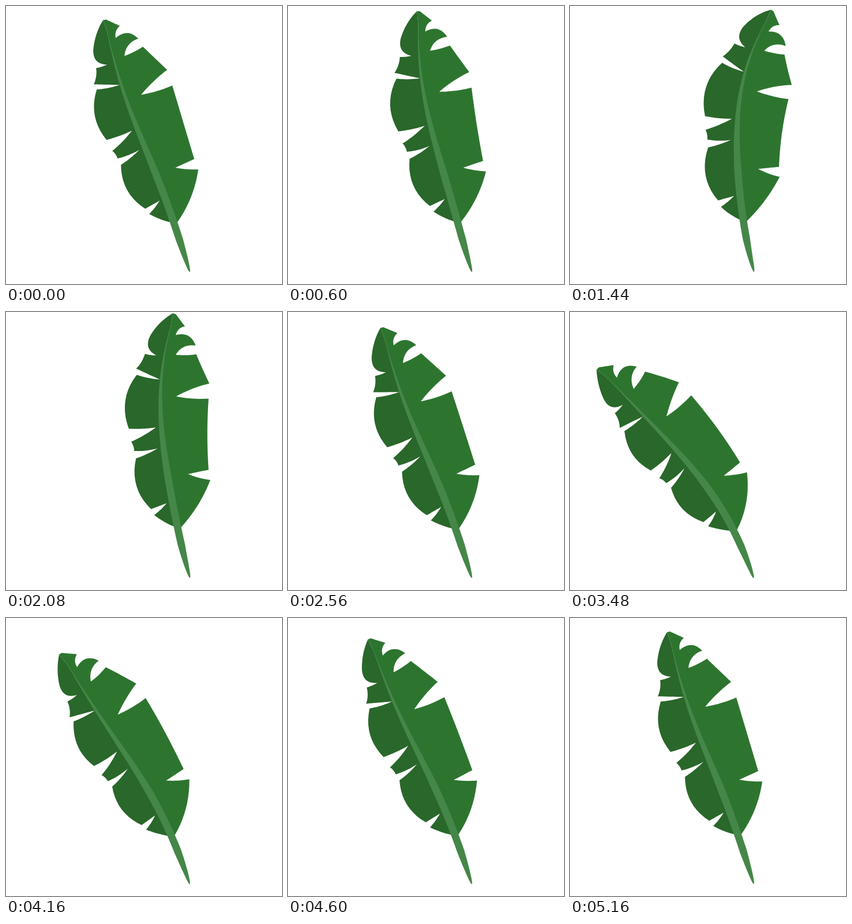
An HTML page with a canvas for the animation above (5.24 s loop, 478x480 px).

```html
<!DOCTYPE html>
<html>
<head>
<meta charset="utf-8">
<style>
html, body { margin: 0; height: 100%; overflow: hidden; background: #fff; }
canvas { display: block; }
</style>
</head>
<body>
<canvas id="stage" width="478" height="480"></canvas>
<script>
const ctx = document.getElementById('stage').getContext('2d');
const LOOP = 5240, STEP = 40;

// The bend axis runs from the pivot, just below the stem, towards the leaf tip.
const PIVOT = [330.7, 481], AXIS = [-0.326, -0.945], LENGTH = 485;
const TIP = [168, 24], LEFT = -1, RIGHT = 1;

// Bend in degrees (positive leans left) at each time, eased between.
const KEYS = [[20, 0], [1570, -44.1], [3355, 34.7], [5160, 0]];

// How far the edge leading out of a cut bows, as a share of its length.
const CUT_BOW = -0.06;

// Lobes from the tip down: two outer corners, the bow between them,
// then the inner end of the cut below and the bow on the way there.
const LEFT_LOBES = [
  { from: TIP, to: [151, 76], bow: 0.12, cut: [175, 101], hook: 0.5 },
  { from: [156, 107], to: [152, 135], bow: -0.14, cut: [197, 136], hook: 0 },
  { from: [157, 144], to: [174, 231], bow: 0.27, cut: [218, 215], hook: 0.05 },
  { from: [184, 250], to: [193, 263], bow: -0.15, cut: [231, 248], hook: 0.08 },
  { from: [199, 274], to: [241, 350], bow: 0.27, cut: [266, 336], hook: 0 },
  { from: [248, 359], to: [287, 374], bow: 0.07, cut: [287, 374], hook: 0 }
];
const RIGHT_LOBES = [
  { from: [173, 23], to: [197, 34], bow: 0, cut: [190, 55], hook: -0.3 },
  { from: [190, 55], to: [229, 56], bow: 0.47, cut: [205, 86], hook: -0.32 },
  { from: [237, 70], to: [279, 110], bow: 0, cut: [234, 153], hook: -0.06 },
  { from: [288, 137], to: [326, 264], bow: 0, cut: [293, 279], hook: 0 },
  { from: [333, 282], to: [297, 373], bow: 0.12, cut: [290, 374], hook: 0 }
];

// Page position of a point u along the axis and v to its right.
function place(u, v) {
  const [ax, ay] = AXIS;
  return [PIVOT[0] + u * ax - v * ay, PIVOT[1] + u * ay + v * ax];
}

const veinCenter = u => u / 50 * Math.sin(Math.PI * (200 - u) / 262) - 5;
const veinHalf = u => Math.min(6.3, 6.3 * Math.sqrt((u - 24) / 60), (470 - u) / 43);

// Follows the vein upwards, on its centre line (side 0) or one of its edges.
function alongVein(first, last, side) {
  const points = [];
  for (let u = first; u <= last; u += 3) {
    points.push(place(u, veinCenter(u) + side * veinHalf(u)));
  }
  return points;
}

// Adds a quadratic curve whose control point is offset sideways by the bow.
function arc(points, [x, y], bow) {
  const [x0, y0] = points[points.length - 1];
  const cx = (x0 + x) / 2 + bow * (y - y0), cy = (y0 + y) / 2 - bow * (x - x0);
  for (let i = 1; i <= 10; i++) {
    const s = i / 10, r = 1 - s;
    points.push([r * r * x0 + 2 * r * s * cx + s * s * x,
                 r * r * y0 + 2 * r * s * cy + s * s * y]);
  }
}

function blade(lobes, side) {
  const points = [TIP];
  for (const { from, to, bow, cut, hook } of lobes) {
    arc(points, from, side * CUT_BOW);
    arc(points, to, side * bow);
    arc(points, cut, side * hook);
  }
  return points.concat(alongVein(115, 465, 0));
}

const vein = alongVein(24, 465, LEFT).concat(alongVein(24, 465, RIGHT).reverse());
const PARTS = [
  ['#29672a', blade(LEFT_LOBES, LEFT)],
  ['#2d752f', blade(RIGHT_LOBES, RIGHT)],
  ['#458748', vein]
];

function bendAt(t) {
  const i = KEYS.findIndex(key => t <= key[0]);
  if (i < 1) return 0;
  const [t0, a] = KEYS[i - 1], [t1, b] = KEYS[i];
  return a + (b - a) * (1 - Math.cos(Math.PI * (t - t0) / (t1 - t0))) / 2;
}

// Wraps the straight axis onto an arc of curvature k.
function bend([x, y], k) {
  const [ax, ay] = AXIS, dx = x - PIVOT[0], dy = y - PIVOT[1];
  const along = dx * ax + dy * ay, side = dy * ax - dx * ay;
  const sin = Math.sin(along * k), cos = Math.cos(along * k);
  return place(sin / k + side * sin, (cos - 1) / k + side * cos);
}

function draw(now) {
  const t = Math.floor(now % LOOP / STEP) * STEP;
  const k = bendAt(t) * Math.PI / 180 / LENGTH || 1e-7;
  ctx.clearRect(0, 0, 478, 480);
  for (const [color, points] of PARTS) {
    ctx.beginPath();
    for (const p of points) ctx.lineTo(...bend(p, k));
    ctx.fillStyle = color;
    ctx.fill();
  }
}

const start = performance.now();
function tick() {
  draw(performance.now() - start);
  requestAnimationFrame(tick);
}
tick();
</script>
</body>
</html>
```
